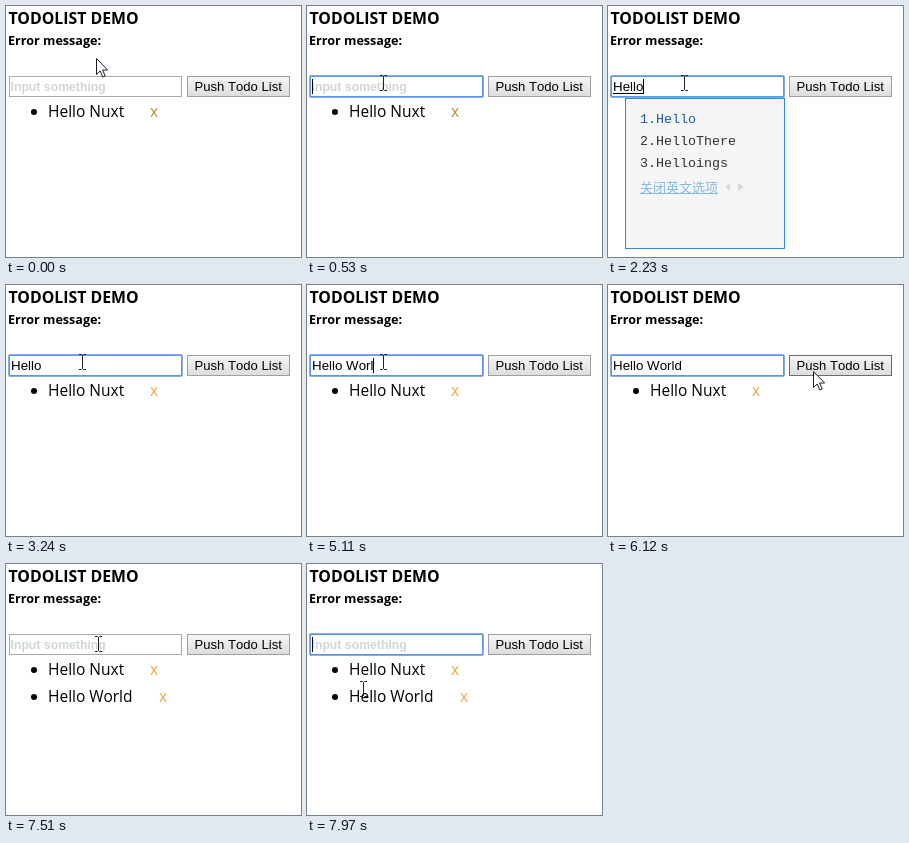
An HTML page that plays this animation: 295x251 px, repeating every 8 s.

```html
<!DOCTYPE html>
<html lang="en">
<head>
<meta charset="utf-8">
<title>Todo list demo</title>
<style>
html, body { margin: 0; width: 100%; height: 100%; overflow: hidden; background: #fff; }
svg { display: block; width: 295px; height: 251px; }
text { white-space: pre; }
.head { font: 700 15.85px "Open Sans", "Noto Sans", sans-serif; }
.error { font-size: 12.6px; }
.list { font: 15.5px "Open Sans", "Noto Sans", sans-serif; }
.del { fill: #f5a340; }
.fresh .del { fill: #b98c30; }
.form { font: 13.333px "Liberation Sans", Arial, sans-serif; font-kerning: none; }
.hint { font-weight: 700; font-size: 12.25px; fill: #d0d6d8; }
.label { font-size: 13.1px; }
.field { fill: #fff; stroke: #a9a9a9; }
.focus .field { stroke: #5e96e6; }
.ring { fill: none; stroke: #86acea; visibility: hidden; }
.focus .ring { visibility: visible; }
.button { fill: url(#shade); stroke: #a0a0a0; }
.hover .button { stroke: #6c6c6c; }
.words { font: 13.333px "Liberation Mono", "Courier New", monospace; fill: #333; }
.words text:first-child { fill: #1d5aa5; }
.option { font: 13px "Noto Sans CJK SC", "Noto Sans CJK", sans-serif; fill: #86b9e8; }
</style>
</head>
<body>
<svg id="stage" viewBox="0 0 295 251">
  <defs>
    <linearGradient id="shade" x2="0" y2="1">
      <stop stop-color="#f6f6f6"/>
      <stop offset="1" stop-color="#dcdcdc"/>
    </linearGradient>
  </defs>

  <g class="head">
    <text x="2.5" y="18">TODOLIST DEMO</text>
    <text class="error" x="2" y="39">Error message:</text>
  </g>

  <g class="list">
    <circle cx="28" cy="106" r="3"/>
    <text x="42" y="111">Hello Nuxt</text>
    <text class="del" x="144" y="111">x</text>
    <g id="added">
      <circle cx="28" cy="133" r="3"/>
      <text x="42" y="138">Hello World</text>
      <text class="del" x="153" y="138">x</text>
    </g>
  </g>

  <g class="form">
    <rect class="ring" x="2.5" y="69.5" width="174" height="22" rx="1"/>
    <rect class="field" x="3.5" y="70.5" width="172" height="20"/>
    <text id="hint" class="hint" x="4.5" y="85">Input something</text>
    <text id="typed" x="5" y="85"></text>
    <rect id="under" x="5" y="87" height="1"/>
    <rect id="caret" y="73" width="1" height="15"/>
    <rect class="button" x="181.5" y="70.5" width="102" height="20"/>
    <text class="label" x="188.5" y="85">Push Todo List</text>
  </g>

  <g id="popup">
    <rect x="17.5" y="92.5" width="159" height="150" fill="#f5f5f5" stroke="#2f8ae0"/>
    <g id="words" class="words"></g>
    <g id="footer">
      <text class="option" x="32" y="5">关闭英文选项</text>
      <path d="M32 6.5h78" stroke="#86b9e8"/>
      <path d="M122 -4v8l-4.500 -4z" fill="#d8d8d8"/>
      <path id="next" d="M130 -4.500v9l5.500 -4.500z"/>
    </g>
  </g>

  <path id="arrow" d="M.5 .5v16l3.700 -3.500 2.600 6 2.400 -1 -2.600 -6h5z" fill="#fff" stroke="#1c1c28"/>
  <path id="beam" d="M-3 -7.500h2.500l1 1 1 -1h2.500M.5 -6.500v13M-3 7.500h2.500l1 -1 1 1h2.500" fill="none" stroke="#222"/>
</svg>

<script>
const LOOP = 8000, STEP = 76.6;
const $ = id => document.getElementById(id);
const stage = $("stage"), typed = $("typed"), words = $("words");

// [time, field text, suggestions]
const typing = [
  [0, ""],
  [1450, "H", "H HongKong HIS HTTP Hi"],
  [1530, "He", "He Hello Help Health Her"],
  [1930, "Hel", "Hel Hello Help Helmet Helpful"],
  [2080, "Hell", "Hell Hello HelloThere Hellish Helloings"],
  [2230, "Hello", "Hello HelloThere Helloings"],
  [2460, "Hello"],
  [2690, "Hello "],
  [4480, "Hello W"],
  [4710, "Hello Wo"],
  [4880, "Hello Wor"],
  [5110, "Hello Worl"],
  [5260, "Hello World"],
  [6345, ""]
];
const focused = [[455, 6270], [7585, LOOP]];
const caretOff = [[990, 1450], [3240, 3790], [4250, 4480], [5720, 6270]];

// Pointer strokes: [start, end], and waypoints [time, x, y]
const strokes = [[70, 610], [5890, 6350], [7280, 7970]];
const path = [
  [0, 90, 52], [20, 90, 52], [450, 77, 76], [605, 76, 77],
  [5830, 76, 77], [6195, 219, 87], [6345, 220, 89],
  [7205, 220, 89], [7510, 92, 80], [7585, 86, 80], [7890, 57, 130], [7965, 56, 125], [LOOP, 56, 125]
];

const within = (t, spans) => spans.some(([a, b]) => t >= a && t < b);
const show = (el, on) => el.setAttribute("visibility", on ? "visible" : "hidden");
const place = (el, x, y) => el.setAttribute("transform", `translate(${x} ${y})`);

function pointer(t) {
  const stroke = strokes.find(([a, b]) => t >= a && t < b);
  if (stroke) t = stroke[0] + Math.floor((t - stroke[0]) / STEP) * STEP;
  const i = path.findIndex(p => p[0] > t);
  const [t0, x0, y0] = path[i - 1], [t1, x1, y1] = path[i];
  const k = (1 - Math.cos(Math.PI * (t - t0) / (t1 - t0))) / 2;
  return [Math.round(x0 + (x1 - x0) * k), Math.round(y0 + (y1 - y0) * k)];
}

function fillPopup(list) {
  words.replaceChildren(...list.map((word, i) => {
    const row = document.createElementNS(stage.namespaceURI, "text");
    row.setAttribute("x", 32);
    row.setAttribute("y", 117 + 22 * i);
    row.textContent = `${i + 1}.${word}`;
    return row;
  }));
  place($("footer"), 0, 115 + 22 * list.length);
  $("next").setAttribute("fill", list.length > 3 ? "#72b2ee" : "#d8d8d8");
}

let current;
function setField(entry) {
  if (entry === current) return;
  current = entry;
  const [, text, list] = entry;
  typed.textContent = text;
  const width = text ? typed.getComputedTextLength() : 0;
  $("caret").setAttribute("x", Math.round(5 + width));
  $("under").setAttribute("width", Math.round(width));
  show($("hint"), !text);
  show($("under"), list);
  $("popup").style.display = list ? "" : "none";
  if (list) fillPopup(list.split(" "));
}

function draw() {
  const t = performance.now() % LOOP;
  const focus = within(t, focused);
  const [x, y] = pointer(t);
  const inField = x > 2 && x < 176 && y > 69 && y < 91;
  const onText = x > 41 && x < 129 && y > 96 && y < 140;
  const beam = inField || onText;

  setField(typing.findLast(e => e[0] <= t));
  show($("caret"), focus && !within(t, caretOff));
  show($("added"), t >= 6345);
  stage.classList.toggle("fresh", t < 1450);
  stage.classList.toggle("focus", focus);
  stage.classList.toggle("hover", x > 180 && x < 284 && y > 69 && y < 91);
  show($("beam"), beam);
  show($("arrow"), !beam);
  place($(beam ? "beam" : "arrow"), x, y);
  requestAnimationFrame(draw);
}
draw();
</script>
</body>
</html>
```
